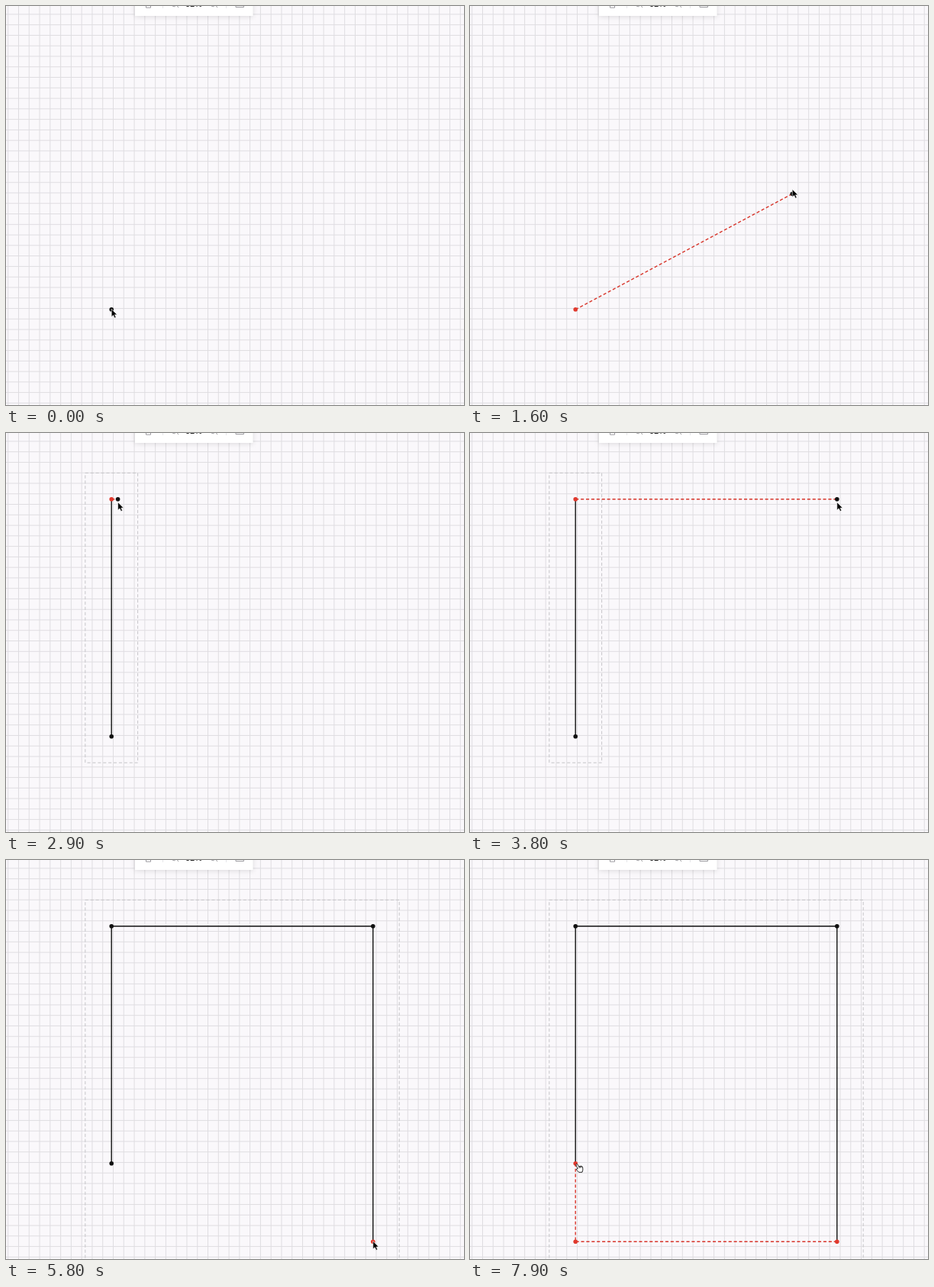
Write an HTML page that moves like this. It is 600 px wide and 523 px high and loops after 8 s.

```html
<!DOCTYPE html>
<html lang="en">
<head>
<meta charset="utf-8">
<title>Polyline drawing</title>
<style>
  html, body { margin: 0; width: 100%; height: 100%; overflow: hidden; background: #faf8fb; }
  svg { display: block; }
  path, rect { fill: none; }
  .grid { stroke: #dfdde1; }
  .bar { fill: #fff; filter: drop-shadow(0 1px 3px rgba(0, 0, 0, .13)); }
  .icons { stroke: #9d9ca1; }
  .zoom { font: 600 10px Inter, Arial, sans-serif; fill: #222; text-anchor: middle; }
  .box { stroke: #c6c5c9; stroke-dasharray: 4.1 2.8; }
  .solid { stroke: #111; stroke-width: 1.4; }
  .dash { stroke: #d8362c; stroke-width: 1.4; stroke-dasharray: 4.1 2.8; }
  #arrow { fill: #000; stroke: #fff; stroke-width: .6; }
  #hand { fill: #fff; stroke: #111; stroke-width: .9; stroke-linejoin: round; }
</style>
</head>
<body>
<svg width="600" height="523" viewBox="0 0 600 523">
  <path class="grid" id="grid"/>
  <rect class="bar" x="169" y="-20" width="154.5" height="33"/>
  <g class="icons">
    <path d="M183.5-4V2.2H189.5V-4M301-4V1.5H311.5V-4"/>
    <path d="M223-1.5L226 2M274-1.5L277 2M218 0Q221 2 223-1M269 0Q272 2 274-1"/>
    <path d="M205.5-6V3M288.5-6V3" stroke="#e6e5e9"/>
  </g>
  <text class="zoom" x="246" y="1.2">62%</text>
  <rect class="box" id="box"/>
  <path class="solid" id="solid"/>
  <path class="dash" id="dash"/>
  <g id="dots"></g>
  <path id="arrow" d="M0 0V10.2L2.4 8.1L4.1 11.8L5.9 11L4.3 7.5H7.4Z"/>
  <path id="hand" d="M.6 1.4Q1.2-.2 2.5 1L4.4 4L7.6 3.4Q9.2 3.8 9.5 5.6L9.6 8.6L8.8 11.4L4.8 11.6L1.2 8.4Q.8 7 2.4 7L3 7.2ZM4.4 4L5 6M6 3.8L6.6 5.8M7.7 3.6L8.2 5.4"/>
</svg>
<script>
const LOOP = 8000, STEP = 100, PAD = 34.4;
const L = 138.2, R = 480.8, T = 86.8, M = 397.8, B = 500.2;
const SNAP_TIME = 6700, CLOSE_TIME = 7900;
const $ = id => document.getElementById(id);

// each vertex and the time it is placed
const verts = [
  { at: 100, p: [L, M] }, { at: 2800, p: [L, T] },
  { at: 4200, p: [R, T] }, { at: 5500, p: [R, B] }
];

// pen strokes in order: Bezier points continue from the previous stroke,
// lag is the pointer's final offset below the pen; no points means a hold
const strokes = [
  { end: 0, lag: -.6, pts: [[L, M]] },
  { end: 1000, lag: -.6, pts: [[385.3, 105.3]] },
  { end: 2000, lag: -9, pts: [[445, 140], [408.5, M]] },
  { end: 2200, lag: -12, pts: [] },
  { end: 2800, lag: 4, pts: [[300, 100], [-130, 120], [L, T]] },
  { end: 3800, lag: 4, pts: [[R, T]] },
  { end: 4300, lag: 4, pts: [] },
  { end: 4800, lag: -.6, pts: [[512, 300], [485.4, 491.4]] },
  { end: 5300, lag: -.6, pts: [[R, B]] },
  { end: 5800, lag: -.6, pts: [] },
  { end: 6600, lag: -9, pts: [[L - 10, B]] },
  { end: SNAP_TIME, lag: -9, pts: [[L, B]] },
  { end: CLOSE_TIME, lag: M - B, pts: [] }
];

const mix = (a, b, p) => a + (b - a) * p;
const ease = p => (1 - Math.cos(Math.PI * p)) / 2;

function bezier(pts, p) {
  if (pts.length === 1) return pts[0];
  const next = pts.slice(1).map((b, i) => b.map((v, k) => mix(pts[i][k], v, p)));
  return bezier(next, p);
}

function pen(t) {
  let prev = strokes[0], from = prev.pts[0];
  for (const s of strokes.slice(1)) {
    if (t < s.end) {
      const p = ease((t - prev.end) / (s.end - prev.end));
      return [...bezier([from, ...s.pts], p), mix(prev.lag, s.lag, p)];
    }
    from = s.pts[s.pts.length - 1] || from;
    prev = s;
  }
  return [...from, prev.lag];
}

function setAttrs(el, attrs) {
  for (const k in attrs) el.setAttribute(k, attrs[k]);
}

const show = (el, on) => { el.style.display = on ? "" : "none"; };
const poly = pts => pts.length ? "M" + pts.map(p => p.join(" ")).join("L") : "";

const dots = Array.from({ length: verts.length + 1 }, () => {
  const c = document.createElementNS("http://www.w3.org/2000/svg", "circle");
  c.setAttribute("r", 2.8);
  return $("dots").appendChild(c);
});

function setDots(list) {
  dots.forEach((c, i) => {
    const d = list[i];
    show(c, d);
    if (d) setAttrs(c, { cx: d.p[0], cy: d.p[1], fill: d.active ? "#e0392e" : "#111" });
  });
}

function setBox(pts) {
  show($("box"), pts.length > 1);
  if (pts.length < 2) return;
  const xs = pts.map(p => p[0]), ys = pts.map(p => p[1]);
  const x = Math.min(...xs) - PAD, y = Math.min(...ys) - PAD;
  setAttrs($("box"), { x, y, width: Math.max(...xs) + PAD - x, height: Math.max(...ys) + PAD - y });
}

function draw(t) {
  const pts = verts.filter(v => v.at <= t).map(v => v.p);
  const last = pts[pts.length - 1];
  const [x, y, lag] = pen(t);
  const aligned = t >= SNAP_TIME, closing = t >= CLOSE_TIME;
  const moved = !last || Math.hypot(x - last[0], y - last[1]) > 1;

  setBox(pts);
  $("solid").setAttribute("d", poly(pts));
  const preview = last && moved ? poly([last, [x, y]]) : "";
  const guide = aligned ? poly([[L, M], [x, y]]) : "";
  $("dash").setAttribute("d", preview + guide);

  const list = pts.map(p => ({ p, active: p === last || (aligned && p === pts[0]) }));
  if (moved) list.push({ p: [x, y], active: closing });
  setDots(list);

  show($("arrow"), !closing);
  show($("hand"), closing);
  $(closing ? "hand" : "arrow").setAttribute("transform", `translate(${x} ${y + lag})`);
}

let grid = "";
for (let x = 2.7; x < 600; x += 13.78) grid += `M${x} 0V523`;
for (let y = 10.9; y < 523; y += 13.77) grid += `M0 ${y}H600`;
$("grid").setAttribute("d", grid);

const start = performance.now();
function tick() {
  const t = (performance.now() - start) % LOOP;
  draw(Math.floor(t / STEP) * STEP);
  requestAnimationFrame(tick);
}
tick();
</script>
</body>
</html>
```
